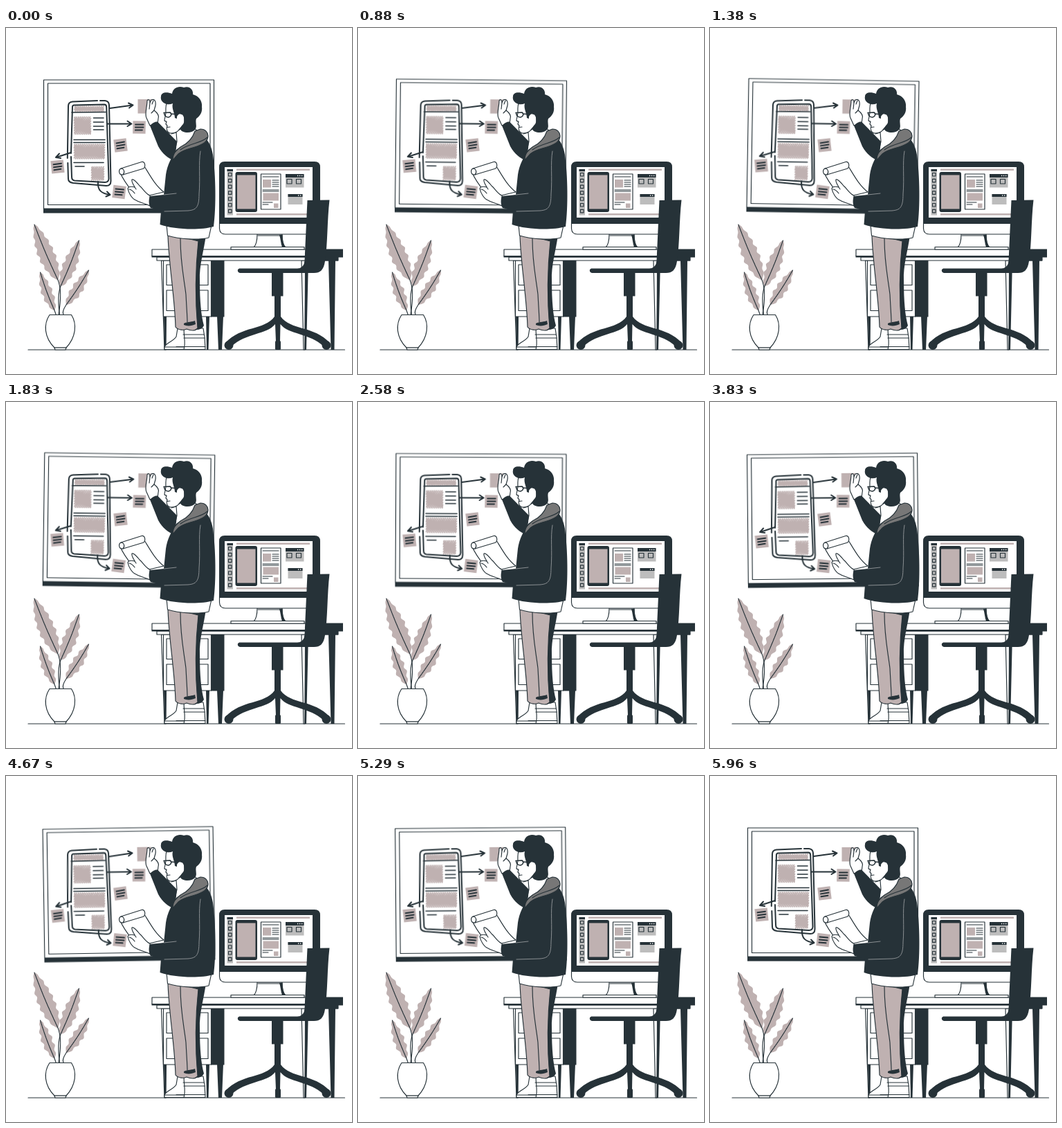
An HTML page that plays this animation: 500x500 px, repeating every 6000 ms.

```html
<!DOCTYPE html>
<html lang="en">
<head>
<meta charset="utf-8">
<title>Designer at the whiteboard</title>
<style>
  html, body { margin: 0; width: 100%; height: 100%; overflow: hidden; background: #fff; }
  svg { display: block; width: 100vw; height: 100vh; }
  .line, .white, .tinted, .hood { stroke: #263238; stroke-width: 1.15; stroke-linecap: round; stroke-linejoin: round; }
  .line, .pen, .seam, .scribble { fill: none; }
  .white { fill: #fff; }
  .blank { fill: #fff; }
  .dark { fill: #263238; }
  .tint, .tinted { fill: #bfb1b1; }
  .grey { fill: #bdbdbd; }
  .hood { fill: #777; }
  .pen { stroke: #263238; stroke-width: 2; stroke-linecap: round; stroke-linejoin: round; }
  .fine { stroke-width: 1.6; }
  .scribble { stroke: #bfb1b1; stroke-width: 1.7; stroke-linejoin: round; }
  .seam { stroke: #8b9093; stroke-width: 1; stroke-linecap: round; }
  #board { transform-origin: 177.5px 171px; animation: sway 6s linear infinite; }
  @keyframes sway {
    0%, 100% { transform: rotate(0deg); }
    25% { transform: rotate(1deg); }
    75% { transform: rotate(-1deg); }
  }
</style>
</head>
<body>
<svg viewBox="0 0 500 500">
  <defs>
    <g id="note">
      <rect class="tint" x="-9.2" y="-9.2" width="18.4" height="18.4"/>
      <path class="pen" d="M-5.5-3.8L6-4.200M-5.500.2L6-.2M-5.500 4.200L4.500 3.800"/>
    </g>
  </defs>

  <path class="line" d="M32 465H489.500"/>

  <g id="plant">
    <g id="leaves"></g>
    <path class="white" d="M63 414.500H94.500C103 428 101 447 87 462H70C55 447 54 428 63 414.500Z"/>
    <path class="white" d="M70 462H87L86 465H71Z"/>
  </g>

  <g id="board">
    <rect class="white" x="54.500" y="75" width="246" height="187"/>
    <rect class="white" x="60.500" y="80" width="234.500" height="175.500"/>
    <rect class="dark" x="54" y="260.500" width="247" height="7"/>
    <g id="scribbles"></g>
    <g class="pen">
      <path d="M132 105L96 106.500Q90 107 90 113L88.800 188M89.300 195L90 218Q90 223 97 224L145 228Q151.500 228 151.500 221L149 111Q148.500 105.500 143 105L136 105"/>
      <path d="M98 111.500L142 110.500Q145 110.500 145.200 114L148.500 218Q148 223 143 223L99 220.500Q95 220 95 215L94 186M94 181L96 114Q96 112 98 111.500"/>
      <path class="fine" d="M95 122L144 121.500M126.500 130H141M126.500 136H141M126.500 142H141M126.500 147H141M98 161.500H143M98 165.500H143M98 194.500H141M100 200H113"/>
      <path d="M150 116L183 111.500M177 108.500L183.500 111.500L178 115.500"/>
      <path d="M146 138.500H181M175.500 134.500L181.500 138.500L175.500 142"/>
      <path d="M94 180L72.500 187M77 181.500L72 187L79 188"/>
      <path d="M133 222C132 235 138 239 150 241M146 236.500L150.500 241L144.500 243.500"/>
    </g>
    <rect class="tint" x="190.500" y="103" width="20" height="20.500"/>
    <use href="#note" transform="translate(192.500 143.500) rotate(1)"/>
    <use href="#note" transform="translate(165.500 169.500) rotate(-7)"/>
    <use href="#note" transform="translate(74.500 200.500) rotate(-6)"/>
    <use href="#note" transform="translate(163.500 237) rotate(7)"/>
  </g>

  <g id="desk">
    <path class="white" d="M224.500 336H231V465H229Z"/>
    <path class="dark" d="M228 416H232L231 465H229ZM289 416H294L292.500 465H290ZM305 416H314L312 465H307Z"/>
    <rect class="white" x="227.500" y="336" width="69" height="81"/>
    <rect class="white" x="232" y="342" width="60" height="29.500"/>
    <rect class="white" x="232" y="379" width="60" height="29.500"/>
    <rect class="dark" x="296" y="336" width="19.500" height="81.500"/>
    <path class="white" d="M427 336H433L432 465H430Z"/>
    <path class="dark" d="M432 336H437L434 465H431.500ZM466 336H476L474.500 465H469.500Z"/>
    <rect class="white" x="218" y="331" width="262" height="5"/>
    <rect class="dark" x="437" y="330" width="43" height="6.500"/>
    <rect class="white" x="211" y="320" width="245" height="9.500"/>
    <rect class="dark" x="210.500" y="329" width="276.500" height="2.500"/>
    <rect class="dark" x="453" y="319.500" width="34" height="10"/>
  </g>

  <g id="monitor">
    <path class="white" d="M363 298C363 308 361 314 358 317H404C401 314 399 308 399 298Z"/>
    <path class="dark" d="M395 299H399.500C399.500 308 401 314 404.500 317H399C397 311 397 305 395 299Z"/>
    <path class="line" d="M364 300H397"/>
    <rect class="white" x="325" y="316.500" width="106" height="3.500"/>
    <path class="white" d="M308.500 280H453.500V290Q453 298 445 298H317Q309 298 308.500 290Z"/>
    <path class="dark" d="M308 283V201Q308 193 316 193H446Q454 193 454 201V283Z"/>
    <rect class="blank" x="316" y="201" width="127" height="73"/>
    <path class="tint" d="M333 203.500H439V206H333ZM333 268H439V270.500H333Z"/>
    <rect class="grey" x="319.500" y="204" width="8.500" height="66.500"/>
    <rect class="dark" x="319.500" y="204" width="8.500" height="3"/>
    <g id="tools"></g>
    <rect class="dark" x="331.500" y="208" width="31.500" height="58" rx="3"/>
    <rect class="tint" x="334" y="212.500" width="26.500" height="49"/>
    <rect class="white" x="368.500" y="211" width="28.500" height="51"/>
    <path class="tint" d="M371 219H383V230.500H371ZM371.500 238.500H394V249.500H371.500ZM387 253.500H393.500V260H387Z"/>
    <path class="line" d="M371 215H394M385 220H394M385 223H394M385 226H394M385 229H394M371 234H394M371 236H394M371 252H385M371 255H379"/>
    <rect class="grey" x="404" y="211" width="26.500" height="19.500"/>
    <rect class="dark" x="404" y="211" width="26.500" height="5"/>
    <path class="line" d="M406 218.500H413V225H406ZM419.500 218.500H426.500V225H419.500Z"/>
    <rect class="grey" x="407.500" y="240" width="21" height="15"/>
    <rect class="dark" x="407.500" y="240" width="21" height="4"/>
    <path d="M421 213.500H429M422 242H427" stroke="#fff" stroke-width="1.300" stroke-dasharray="1.300 1.700"/>
  </g>

  <g id="chair">
    <path class="dark" d="M435.500 249L467.500 248.500C464 278 465 312 461 337C459 350 454 354 445 354H338Q334 353 335 349L337 347.500H421Q431 347 431.500 336Z"/>
    <path class="dark" d="M384 353H400.500V387.500H397V419H388V387.500H384Z"/>
    <path class="dark" d="M388 412V417C374 437 340 430 317 455L326 460C346 441 377 443 389 428L390 453H396L396.500 428C408 443 439 441 459 460L468 455C445 430 411 437 397 417V412Z"/>
    <circle class="dark" cx="322" cy="458.500" r="6.500"/>
    <circle class="dark" cx="463" cy="458.500" r="6.500"/>
    <rect class="dark" x="389" y="452" width="8" height="13" rx="1.500"/>
  </g>

  <g id="person">
    <path class="white" d="M257 434L256 446C252 452 247 456 246 464.500H288L287 447L285 434Z"/>
    <path class="white" d="M248 434L246 446C242 453 231 455 229 461V464.500H257C260 455 257 447 257 434Z"/>
    <path class="line" d="M229 461H257M246 460.500H288M256 443H286M257 448H287"/>
    <path class="dark" d="M254 302L289 299C286 322 279 343 280 365C280 395 282 416 286 430Q283 436 275 436L270 309Z"/>
    <path class="tinted" d="M234 299C235 340 244 390 245 432C249 437 257 437 261 435C268 438 274 437 277 434C273 390 274 345 278 308L254 302Z"/>
    <path class="line" d="M252 304C252 340 257 360 260 385C261 405 262 417 262 425"/>
    <path class="dark" d="M257 427C262 424 270 425 273 423L274 428C268 431 261 431 257 429Z"/>
    <path class="white" d="M232 284L233.500 300C250 305 278 307 293 303L297 285Z"/>

    <path class="white" d="M239 153L246 151L247 164L243 181L270 168L276 148L264 140Z"/>
    <path class="white" d="M233 106C230 113 231 119 231 123L229 133C229 135 231 135 232 135L231 139L233 141C231 148 234 152 238 152C244 152 248 150 250 147L258 138L257 112Z"/>
    <path class="line" d="M233 143.500L237 143"/>
    <path class="dark" d="M224 99C224 93 232 92 240 95C241 86 250 83 257 86C266 83 271 90 270 96C279 98 284 106 283 114C284 121 281 127 275 131C273 137 277 142 273 147C269 152 259 152 254 149C250 146 253 142 256 139C259 133 257 126 254 125C249 123 247 127 247 131L244 130C244 123 239 117 241 109C233 113 222 107 224 99Z"/>
    <path class="blank" d="M247 131C247 125 251 123 254 126C258 129 257 135 253 138C250 139 248 137 247 134"/>
    <path class="pen fine" d="M228 122.500L237 122C240 124 239 128 235 129C231 129 229 127 228.500 123M239 124L248 125"/>

    <path class="white" d="M208 141L203 130C200 124 204 114 204 105C206 102 208 104 208 108L210 104C214 102 217 105 216 112L214 119C218 122 222 126 220 131L219 138Z"/>
    <path class="line" d="M208 108L207 117M211 110L213 105M214 119L210 123"/>
    <path class="dark" d="M208 141C211 138 215 135 219 135.500L247 164L244 192C235 189 226 182 220 171Z"/>

    <path class="white" d="M165 209L200 200C208 213 216 228 228 237L190 246C180 233 170 222 165 209Z"/>
    <path class="white" d="M166 203L196 193.500C201 192 202 200 199 203L169 212C163 213 162 205 166 203Z"/>
    <path class="line" d="M166 203C171 203 172 209 169 212"/>
    <path class="white" d="M208 242C202 240 198 232 193 228C189 223 184 218 182 219C181 222 184 226 186 230C182 229 177 229 176 232C177 238 182 247 188 249C195 253 202 254 208 257Z"/>
    <path class="line" d="M186 230L188 233M178 233C182 234 184 236 186 239"/>

    <path class="dark" d="M247 175C239 187 233 198 231 212L228 241L208 243C206 248 206 255 209 260L224 264L222.500 284C242 291 279 293 300 287C304 258 303 213 299 183C297 172 294 166 289 160Z"/>
    <path class="seam" d="M281 178C278 195 281 216 279 240C279 259 275 263 263 264L229 265M228 241L246 239"/>
    <path class="hood" d="M273 149L281 146C288 146 292 151 292 156C292 164 285 168 276 171C264 175 255 176 249 182L241 191C241 181 246 177 252 172C263 167 270 158 273 149Z"/>
    <path class="line" d="M291 158C282 167 265 166 252 176"/>
  </g>
</svg>
<script>
  const SVG_NS = "http://www.w3.org/2000/svg";

  function add(parent, tag, attrs) {
    const el = document.createElementNS(SVG_NS, tag);
    for (const name in attrs) el.setAttribute(name, attrs[name]);
    document.getElementById(parent).append(el);
  }

  const point = (x, y) => `${x.toFixed(1)} ${y.toFixed(1)}`;

  // Wavy-edged leaf along a bent midrib, whose stem runs on into the pot.
  function leaf(tipX, tipY, baseX, baseY, half, bend, potX) {
    const dx = baseX - tipX, dy = baseY - tipY, len = Math.hypot(dx, dy);
    const nx = -dy / len, ny = dx / len;
    const steps = 60, rib = [], right = [], left = [];
    for (let i = 0; i <= steps; i++) {
      const t = i / steps;
      const arc = bend * Math.sin(Math.PI * t);
      const body = Math.pow(Math.max(0, Math.sin(Math.PI * Math.pow(t, 1.15))), 0.6);
      const w = body * (half + 1.5 * Math.sin(t * len / 2));
      const x = tipX + dx * t + nx * arc, y = tipY + dy * t + ny * arc;
      rib.push(point(x, y));
      right.push(point(x + nx * w, y + ny * w));
      left.unshift(point(x - nx * w, y - ny * w));
    }
    add("leaves", "path", { class: "tint", d: `M${right.concat(left).join("L")}Z` });
    add("leaves", "path", {
      class: "line",
      d: `M${rib.join("L")}Q${baseX + dx * 0.2} ${baseY + dy * 0.2} ${potX} 414`
    });
  }

  leaf(41, 284, 75, 364, 11.5, 1, 76);
  leaf(105.5, 307, 79, 373, 9.5, -1, 77.5);
  leaf(49.5, 353, 70, 408, 7.5, 1, 72);
  leaf(119.5, 350, 87, 400, 7.5, -1, 83);

  // Felt-pen zigzag that fills a box with rising diagonal strokes.
  function scribble(x, y, w, h, gap = 2.7, lean = 0.75) {
    const run = h * lean, points = [];
    for (let u = gap / 2; u < w + run; u += gap) {
      points.push(u < run ? point(x, y + u / lean) : point(x + u - run, y + h));
      points.push(u < w ? point(x + u, y) : point(x + w, y + (u - w) / lean));
    }
    add("scribbles", "path", { class: "scribble", d: `M${points.join("L")}` });
  }

  scribble(99, 113, 42, 8);
  scribble(98.5, 128.5, 24, 25);
  scribble(98.5, 168, 44, 21);
  scribble(123.5, 200.5, 18, 19.5);

  for (let i = 0; i < 7; i++) {
    add("tools", "rect", { class: "line", x: 321.5, y: 209.5 + i * 8.8, width: 4.5, height: 4.5 });
  }
</script>
</body>
</html>
```
